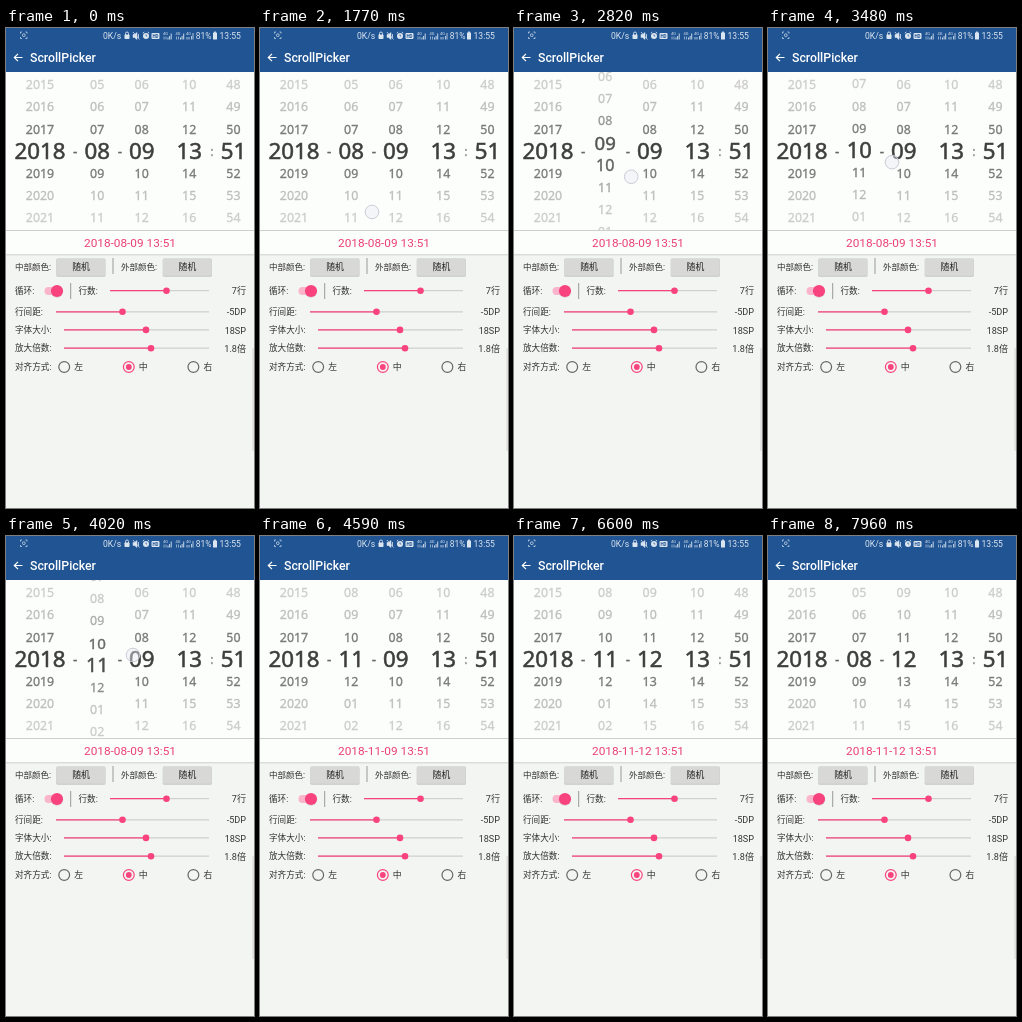
Write an HTML page that moves like this. It is 248x480 px and loops after 7.99 s.

```html
<!DOCTYPE html>
<html lang="zh">
<head>
<meta charset="utf-8">
<title>ScrollPicker</title>
<style>
html, body { margin: 0; width: 100%; height: 100%; overflow: hidden; background: #f3f5f2; }
svg { display: block; width: 100%; height: 100%; font-family: Roboto, "Noto Sans CJK SC", "Noto Sans CJK", sans-serif; }
.wheels { font-family: "Noto Sans", sans-serif; }
</style>
</head>
<body>
<svg id="stage" viewBox="0 0 248 480">
  <defs><clipPath id="window"><rect y="44" width="248" height="158"/></clipPath></defs>
</svg>
<script>
const LOOP = 7990, ROW = 22.1, MID = 123.2, SMALL = 12.4, ZOOM = 1.8;
const PINK = '#f8437f', INK = '#333', BLUE = '#205493';
const stage = document.getElementById('stage');

function add(tag, attrs, parent = stage) {
  const el = document.createElementNS('http://www.w3.org/2000/svg', tag);
  for (const k in attrs) el.setAttribute(k, attrs[k]);
  parent.appendChild(el);
  return el;
}
const rect = (x, y, width, height, fill, rx = 0) => add('rect', { x, y, width, height, fill, rx });
const circle = (cx, cy, r, fill, more) => add('circle', { cx, cy, r, fill, ...more });
const path = (d, stroke, width = 1, more) =>
  add('path', { d, stroke, 'stroke-width': width, fill: 'none', ...more });
// y is the middle of the capitals
function text(str, x, y, size, fill, anchor = 'start', weight = 400, parent = stage) {
  const el = add('text', { x, y: y + size * 0.357, 'font-size': size, fill,
    'text-anchor': anchor, 'font-weight': weight }, parent);
  el.textContent = str;
  return el;
}

function drawHeader() {
  rect(0, 0, 248, 44, BLUE);
  const pale = '#dbe5f0';
  path('M14.5 5.5V4h1.5M19.5 4H21v1.5M21 9v1.5h-1.5M16 10.500h-1.500V9', pale, 0.7);
  circle(17.8, 7.2, 1.4, 'none', { stroke: pale, 'stroke-width': 0.7 });
  text('0K/s', 97, 8, 8.6, pale);
  rect(118.5, 6.5, 5, 4.5, pale, 0.8);
  path('M119.5 7V5.500a1.500 1.500 0 0 1 3 0V7', pale, 0.9);
  path('M127 6.500h1.500l2.500-2v7l-2.500-2H127z', pale, 0.5, { fill: pale });
  path('M127 4l6.500 7.500M132.500 6v4', pale, 0.8);
  circle(140, 8, 3, pale);
  path('M136.800 5.200l1.500-1.200M143.200 5.200l-1.500-1.200', pale, 0.9);
  path('M140 6.500V8h1.200', BLUE, 0.7);
  rect(145.5, 5, 8, 6, pale, 1);
  text('HD', 149.5, 8, 4.5, BLUE, 'middle', 700);
  for (const x of [157, 169.5]) {
    text('4G', x, 5.8, 4, pale);
    path(`M${x + 1} 8.5v3M${x + 3} 8.5v3`, pale, 0.6);
    path(`M${x + 5} 11.5v-2M${x + 6.6} 11.5V8M${x + 8.2} 11.5V5.5`, pale, 0.9);
  }
  text('4G', 180, 6, 4, pale);
  path('M181 9v2.500M183 9v2.500M185.500 11.500V8M187 11.500V5', pale, 0.8);
  text('81%', 189.8, 8, 8.5, pale);
  rect(207, 4.5, 4, 7, pale, 0.6);
  rect(208, 3.6, 2, 1.2, pale);
  text('13:55', 213.5, 8, 8.6, pale);
  path('M16.500 29.500H8.500M12 25.800l-3.700 3.700 3.700 3.700', '#fff', 1.2);
  text('ScrollPicker', 24, 29.5, 12.3, '#fff', 'start', 500);
}

function slider(label, y, x, from, knob, value) {
  text(label, x, y, 8.6, INK);
  path(`M${from} ${y}H203`, '#cfd1ce', 1.3);
  path(`M${from} ${y}H${knob}`, PINK, 1.3);
  circle(knob, y, 3.3, PINK);
  text(value, 240, y + 0.4, 9.1, INK, 'end');
}

function drawSettings() {
  [['中部颜色:', 9, 50.6], ['外部颜色:', 115, 157]].forEach(([label, x, bx]) => {
    text(label, x, 239.2, 8.5, INK);
    rect(bx - 0.3, 230.8, 49.2, 18, '#c6c8c5', 1.4);
    rect(bx, 230.2, 48.6, 17.6, '#d8d9d7', 1.2);
    text('随机', bx + 24.4, 239, 8.8, '#222', 'middle');
  });
  path('M107 230v16M64.700 255v16', '#999', 1);
  text('循环:', 9, 263, 8.6, INK);
  rect(38.5, 259, 18, 8, '#fab4cc', 4);
  circle(51, 263.7, 6.2, '#c8c8c8', { opacity: 0.6 });
  circle(51, 263, 6.1, PINK);
  slider('行数:', 262.7, 72.5, 104, 160.5, '7行');
  slider('行间距:', 283.8, 9, 50, 116.5, '-5DP');
  slider('字体大小:', 301.9, 9, 58, 140, '18SP');
  slider('放大倍数:', 320.2, 9, 58, 145, '1.8倍');
  text('对齐方式:', 9, 339, 8.6, INK);
  ['左', '中', '右'].forEach((label, i) => {
    const x = 58.2 + i * 64.6, on = i === 1;
    circle(x, 339, 5.4, 'none', { stroke: on ? PINK : '#666', 'stroke-width': 1.2 });
    if (on) circle(x, 339, 2.9, PINK);
    text(label, x + 10, 339, 8.8, INK);
  });
  rect(246.3, 320, 2, 103, '#dedfdd', 1);
}

rect(0, 0, 248, 480, '#f3f5f2');
rect(0, 44, 248, 183, '#fcfefb');
drawHeader();
path('M0 202.500H248M0 226.800H248', '#cdcfcc', 1);
drawSettings();
const dateLabel = text('', 124, 214.6, 11.8, '#ea3f78', 'middle');
const wheels = add('g', { class: 'wheels', 'clip-path': 'url(#window)' });

// text with a thin outline for a medium weight
function setInk(el, size, fill) {
  el.setAttribute('fill', fill);
  el.setAttribute('stroke', fill);
  el.setAttribute('stroke-width', size * 0.025);
}
[['-', 69.3, 13.5, '#666'], ['-', 114, 13.5, '#666'], [':', 205.8, 12.4, '#888']].forEach(([mark, x, size, fill]) =>
  setInk(text(mark, x, MID + 0.5, size, fill, 'middle', 400, wheels), size, fill));

const pad = n => String(n).padStart(2, '0');
const wrap = (n, first, count) => pad(((n - first) % count + count) % count + first);

function wheel(x, format) {
  const rows = Array.from({ length: 9 }, () => text('', x, 0, SMALL, INK, 'middle', 400, wheels));
  return pos => {
    const base = Math.round(pos);
    rows.forEach((el, i) => {
      const n = base + i - 4, d = n - pos;
      const size = SMALL * (1 + (ZOOM - 1) * Math.max(0, 1 - Math.abs(d)));
      el.textContent = format(n);
      el.setAttribute('font-size', size);
      el.setAttribute('y', MID + d * ROW + size * 0.357);
      setInk(el, size, shade(Math.abs(d)));
    });
  };
}
// grey level by distance from the middle row
function shade(d) {
  const g = Math.round(track(d, [[0, 62], [1, 122], [2, 190], [3, 204]])[0]);
  return `rgb(${g},${g},${g})`;
}
// piecewise linear interpolation over [key, ...values]
function track(t, keys) {
  if (t <= keys[0][0]) return keys[0].slice(1);
  for (let i = 1; i < keys.length; i++) {
    const a = keys[i - 1], b = keys[i];
    if (t <= b[0]) {
      const p = (t - a[0]) / (b[0] - a[0]);
      return a.slice(1).map((v, j) => v + (b[j + 1] - v) * p);
    }
  }
  return keys[keys.length - 1].slice(1);
}
function glide(t, start, end, from, to) {
  const p = Math.min(1, Math.max(0, (t - start) / (end - start)));
  return from + (to - from) * (1 - (1 - p) ** 2);
}

wheel(34, n => n)(2018);
const setMonth = wheel(91.2, n => wrap(n, 1, 12));
const setDay = wheel(135.7, n => wrap(n, 1, 31));
wheel(183.2, n => wrap(n, 0, 24))(13);
wheel(227.4, n => wrap(n, 0, 60))(51);
const finger = circle(0, 0, 6.8, '#e9ecf5', { 'fill-opacity': 0.45, stroke: '#c9ccd6', 'stroke-width': 1 });

const DRAG = [[1770, 112, 184], [2310, 112, 160], [3480, 124, 134.2], [4020, 127, 119], [4200, 127, 117.5]];
const FLICK = [[6090, 140, 188], [6290, 143, 150]];

function month(t) {
  if (t >= 7600) return glide(t, 7600, 7960, 11, 8);
  const dragged = 8 + Math.max(0, 179 - track(t, DRAG)[1]) / 22;
  return t < 4230 ? dragged : glide(t, 4200, 4590, dragged, 11);
}

function render(t) {
  setMonth(month(t));
  setDay(glide(t, 6110, 6600, 9, 12));
  dateLabel.textContent = `2018-${t < 4590 ? '08' : '11'}-${t < 6600 ? '09' : '12'} 13:51`;
  const dragging = t >= 1080 && t < 4230, flicking = t >= 6090 && t < 6290;
  const [x, y] = track(t, flicking ? FLICK : DRAG);
  finger.setAttribute('cx', x);
  finger.setAttribute('cy', y);
  finger.setAttribute('visibility', dragging || flicking ? 'visible' : 'hidden');
}

const start = performance.now();
function tick() {
  render((performance.now() - start) % LOOP);
  requestAnimationFrame(tick);
}
render(0);
requestAnimationFrame(tick);
</script>
</body>
</html>
```
